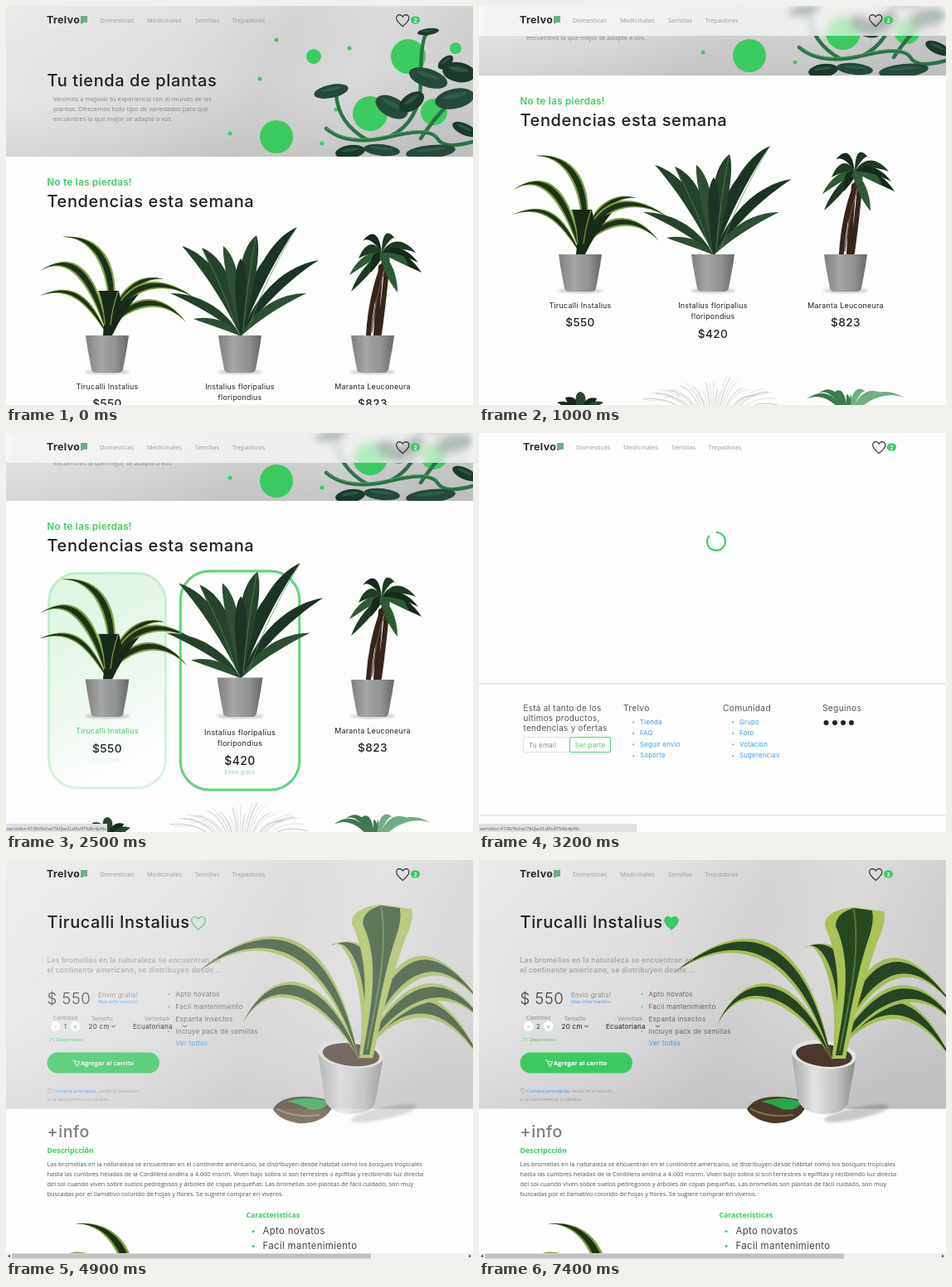
These frames come from a looping animation (563 by 482 pixels, 8 s). An HTML page:

```html
<!DOCTYPE html>
<html lang="es">
<head>
<meta charset="utf-8">
<title>Tienda de plantas</title>
<style>
html, body { margin: 0; width: 100%; height: 100%; overflow: hidden; background: #fff; }
svg { display: block; width: 100%; height: 100%; }
text { white-space: pre; }
.m { font-family: Inter, sans-serif; letter-spacing: .03em; }
.o { font-family: "Open Sans", sans-serif; }
</style>
</head>
<body>
<svg id="stage" viewBox="0 0 563 482" xmlns="http://www.w3.org/2000/svg"></svg>
<script>
const GREEN = '#3ccb60', INK = '#1d2022', BLUE = '#3a9bf4', GREY = '#9a9a9a';
const LOOP = 8000;

// ---- drawing helpers ----
const text = (x, y, s, size, fill = INK, o = {}) =>
  `<text class="${o.f || 'm'}" x="${x}" y="${y}" font-size="${size}" fill="${fill}" font-weight="${o.w || 400}" text-anchor="${o.a || 'start'}"${o.id ? ` id="${o.id}"` : ''}>${s}</text>`;
const sans = (x, y, s, size, fill, o = {}) => text(x, y, s, size, fill, { f: 'o', ...o });
const rect = (x, y, w, h, fill, more = '') => `<rect x="${x}" y="${y}" width="${w}" height="${h}" fill="${fill}" ${more}/>`;
const dot = (x, y, r, fill) => `<circle cx="${x}" cy="${y}" r="${r}" fill="${fill}"/>`;
const oval = (x, y, rx, ry, fill, rot = 0, more = '') =>
  `<ellipse cx="${x}" cy="${y}" rx="${rx}" ry="${ry}" fill="${fill}" transform="rotate(${rot} ${x} ${y})" ${more}/>`;
const path = (d, fill, more = '') => `<path d="${d}" fill="${fill}" ${more}/>`;
const line = (d, color, w, more = '') => path(d, 'none', `stroke="${color}" stroke-width="${w}" stroke-linecap="round" ${more}`);
const group = (id, body, more = '') => `<g id="${id}" ${more}>${body}</g>`;
const grad = (id, stops, dir) => `<linearGradient id="${id}" ${dir}>` +
  stops.map(([o, c, a = 1]) => `<stop offset="${o}" stop-color="${c}" stop-opacity="${a}"/>`).join('') + '</linearGradient>';

// Leaf around a cubic midline, w = bulge to each side
function leaf([a, b, c, d, e, f, g, h], w, fill) {
  const len = Math.hypot(g - a, h - b), nx = -(h - b) / len * w, ny = (g - a) / len * w;
  return path(`M${a} ${b}C${c + nx} ${d + ny} ${e + nx} ${f + ny} ${g} ${h}C${e - nx} ${f - ny} ${c - nx} ${d - ny} ${a} ${b}`, fill);
}
const striped = (bx, by, list, edge, core) => list.map(([x, y, c, d, e, f, w]) => {
  const p = [bx, by, c, d, e, f, x, y];
  return leaf(p, w, edge) + leaf(p, w * .6, core);
}).join('');
const blades = (bx, by, list, lift, colors) => list.map(([x, y, w], i) => {
  const dx = x - bx, dy = y - by;
  const p = [bx, by, bx + dx * .25, by + dy * .5 - lift, bx + dx * .65, by + dy * .85 - lift, x, y];
  return leaf(p, w, colors[i % colors.length]);
}).join('');
const heart = (x, y, w, stroke, sw, id) =>
  `<path id="${id}" transform="translate(${x} ${y}) scale(${w / 18})" fill="none" stroke="${stroke}" stroke-width="${sw}" d="M9 16C3 11 .7 8 .7 5C.7 2.400 2.700 .7 4.900 .7C6.700 .7 8.200 1.700 9 3.300C9.800 1.700 11.300 .7 13.100 .7C15.300 .7 17.300 2.400 17.300 5C17.300 8 15 11 9 16Z"/>`;
const bullets = (x, y, step, items, size, fill, r = 1) => items.map((s, i) =>
  dot(x - size * 1, y + i * step - size * .3, r, GREEN) + text(x, y + i * step, s, size, fill)).join('');

// ---- plants ----
const pot = x => oval(x, 442, 27, 3, '#777', 0, 'opacity=".35" filter="url(#soft)"') +
  path(`M${x - 26} 398H${x + 26}L${x + 24} 412L${x + 19} 439Q${x + 18} 443 ${x + 13} 443H${x - 13}Q${x - 18} 443 ${x - 19} 439L${x - 24} 412Z`, 'url(#pot)');

const bromelia = striped(122, 397, [
  [41, 350, 105, 365, 85, 332, 5], [217, 382, 135, 365, 180, 338, 7],
  [190, 330, 130, 360, 155, 322, 6], [228, 353, 135, 345, 175, 318, 7],
  [40, 321, 112, 350, 88, 288, 8], [68, 279, 137, 340, 122, 276, 8]
], '#7f9f45', '#1c3319') +
  path('M111 344H136L140 362Q146 352 160 348Q140 372 128 398H117Q121 370 111 344', '#172a17') +
  line('M112 345Q118 365 119 385M135 345Q128 365 126 385', '#7f9f45', 1.2);

const sword = blades(283, 399, [
  [198, 347, 7], [377, 307, 8], [362, 347, 7], [212, 290, 9], [351, 267, 9],
  [226, 378, 6], [236, 292, 10], [330, 292, 9], [262, 290, 9], [302, 277, 13], [283, 305, 9]
], 2, ['#25422b', '#1b3423', '#2e4f34']) +
  line('M286 392Q290 340 301 280M278 390Q262 340 237 294M292 390Q312 330 349 270', '#5d8a61', .7);

const pachira = line('M437 397Q440 350 455 312M446 397Q448 355 452 315M450 396Q455 360 459 318', '#35251b', 6) +
  line('M441 394Q446 350 456 320', '#65503e', 1.4) +
  blades(453, 298, [
    [416, 345, 6], [414, 325, 6], [501, 322, 7], [494, 298, 6], [472, 346, 7], [430, 284, 6],
    [470, 282, 6], [486, 315, 8], [440, 322, 7], [425, 305, 7], [460, 320, 8], [497, 310, 5]
  ], 12, ['#1e3a22', '#2f5a35', '#16291a']);

const noise = i => { const v = Math.sin(i * 91.7 + 4) * 4375.5; return v - Math.floor(v); };
let grass = '';
for (let i = 0; i < 34; i++) {
  const x = 198 + i * 5, y = 541 + Math.abs(x - 282) * .22 + noise(i) * 22;
  grass += line(`M282 640Q${282 + (x - 282) * .35} 565 ${x} ${y}`, i % 3 ? '#d6d4cf' : '#b3afa8', .7);
}
const secondRow = blades(123, 600, [[104, 571, 7], [122, 564, 8], [142, 572, 7], [150, 577, 6], [94, 577, 5]], 4, ['#16281a', '#29462d']) +
  grass + blades(445, 600, [
    [395, 573, 4], [512, 571, 4], [408, 567, 4], [490, 569, 4], [425, 568, 5], [468, 566, 5], [447, 572, 4]
  ], 16, ['#3d7a50', '#6fae80']);

const bigBromelia =
  oval(455, 306, 40, 7, '#555', -12, 'opacity=".3" filter="url(#soft)"') +
  path('M323 301Q332 285 362 286Q392 288 395 296Q386 318 354 318Q330 314 323 301', '#4b3a2a') +
  path('M340 292Q365 284 389 292Q385 304 366 301Q352 294 340 292', '#27a64a') +
  line('M328 301Q350 312 378 308', '#8b6d4e', 2) +
  path('M377 236L385 291Q392 307 417 307Q442 306 445 292L455 236Z', 'url(#bigPot)') +
  oval(416, 235, 39, 17, '#e4e5e4', 6) + oval(416, 236, 34, 13.5, '#4a382c', 6) +
  striped(425, 241, [
    [572, 245, 465, 172, 518, 145, 17], [580, 207, 470, 160, 530, 128, 15],
    [576, 182, 460, 130, 512, 88, 18], [287, 199, 395, 165, 325, 122, 14],
    [234, 137, 392, 108, 322, 68, 15], [392, 106, 458, 165, 430, 85, 20]
  ], '#a3bd55', '#264423') +
  path('M426 240C432 180 440 130 417 80Q415 62 450 57L488 62Q492 72 481 97C467 135 452 190 442 240Z', '#a9c257') +
  path('M430 236C440 180 451 125 430 80Q430 64 452 58L474 61Q477 75 469 97C456 135 447 190 438 236Z', '#27471f') +
  line('M435 230C447 165 460 115 452 60', '#55783c', 2);

// ---- home ----
const circles = [
  [326, 41, 2.5], [371, 61, 9], [414, 51, 2.5], [306, 88, 2.5], [485, 61, 21], [542, 51, 7], [439, 130, 21],
  [516, 128, 16], [326, 158, 20], [270, 154, 2.5], [381, 166, 2.5], [398, 125, 2.5]
].map(c => dot(...c, GREEN)).join('');
const vineLeaves = [
  [392, 103, 21, 8, -12], [509, 31, 13, 4, -8], [509, 87, 24, 11, 18], [546, 80, 20, 12, 10], [465, 122, 21, 12, 28],
  [489, 116, 17, 10, -35], [541, 112, 24, 12, -12], [415, 176, 18, 8, -8], [453, 174, 22, 7, 6], [553, 149, 16, 7, 25],
  [512, 176, 30, 8, -6], [530, 68, 11, 6, -40]
].map(([x, y, a, b, r], i) => oval(x, y, a, b, i % 2 ? '#1b3a2a' : '#25493a', r) +
  oval(x, y - b * .3, a * .6, b * .25, '#43705a', r, 'opacity=".5"')).join('');
const backdrop = h => rect(0, 0, 563, h, 'url(#wall)') + rect(0, 0, 563, h, 'url(#floor)');
const hero = group('hero', backdrop(182) + circles +
  line('M386 148Q412 170 462 158T520 160T563 164M398 106Q400 142 436 162M462 158Q500 140 500 90T507 34M500 160Q520 130 541 112', '#2c7247', 4.5) +
  line('M386 147Q412 168 462 156T520 158', '#5aa375', 1) + vineLeaves, 'clip-path="url(#heroClip)"') +
  text(49.5, 97, 'Tu tienda de plantas', 20, INK, { w: 500 }) +
  ['Venimos a mejorar tu experiencia con el mundo de las', 'plantas. Ofrecemos todo tipo de variedades para que',
    'encuentres la que mejor se adapte a vos.'].map((s, i) => sans(57, 115 + i * 12, s, 7.55, '#858585')).join('');

const products = [
  [122, ['Tirucalli Instalius'], '$550', bromelia],
  [282, ['Instalius floripalius', 'floripondius'], '$420', sword],
  [442, ['Maranta Leuconeura'], '$823', pachira]
];
const cards = products.map(([x, name, price, plant], i) => {
  const py = 485 + (name.length - 1) * 13.5;
  return group('card' + i,
    rect(x - 71, 269, 142, 260, 'url(#tint)', `rx="35" id="tint${i}"`) +
    rect(x - 70, 270, 140, 258, 'none', `rx="34" stroke="${GREEN}" stroke-width="3" id="edge${i}"`) +
    group('name' + i, name.map((s, k) => text(x, 463 + k * 13, s, 8.9, 'inherit', { a: 'middle' })).join('')) +
    text(x, py, price, 13.6, INK, { w: 500, a: 'middle' }) +
    text(x, py + 11, 'Envio gratis', 6.2, GREEN, { a: 'middle', id: 'free' + i })) +
    group('plant' + i, plant + pot(x));
}).join('');
const home = group('home', rect(0, 0, 563, 700, '#fdfdfd') + hero +
  text(49.5, 217, 'No te las pierdas!', 11.5, GREEN, { w: 600 }) +
  text(49.5, 243, 'Tendencias esta semana', 20, INK, { w: 500 }) + secondRow + cards);

// ---- loading ----
const loading = group('loading', rect(0, 0, 563, 482, '#fdfdfd') +
  `<circle id="spin" cx="286" cy="131" r="11" fill="none" stroke="${GREEN}" stroke-width="2" pathLength="360" stroke-dasharray="310 50"/>` +
  rect(0, 302, 563, 1, '#dcdcdc') + rect(0, 303, 563, 1, '#f3f3f3') + rect(0, 461, 563, 1.5, '#e6e6e6') +
  ['Está al tanto de los', 'ultimos productos,', 'tendencias y ofertas'].map((s, i) => text(53.5, 336 + i * 12, s, 9.9, '#555')).join('') +
  text(174, 336, 'Trelvo', 10.2, '#555') + text(294, 336, 'Comunidad', 10.2, '#555') + text(414, 336, 'Seguinos', 10.2, '#555') +
  rect(53.5, 367.500, 56, 18, '#fff', 'rx="1.5" stroke="#d5d8db" stroke-width=".8"') + text(60, 379.500, 'Tu email', 7.9, '#888') +
  rect(109.500, 367.500, 49, 18, '#fff', `rx="1.5" stroke="${GREEN}" stroke-width=".9"`) + text(134, 379.500, 'Ser parte', 7.9, GREEN, { a: 'middle' }) +
  bullets(194, 351.500, 13.6, ['Tienda', 'FAQ', 'Seguir envio', 'Soporte'], 7.8, BLUE) +
  bullets(314, 351.500, 13.6, ['Grupo', 'Foro', 'Votación', 'Sugerencias'], 7.8, BLUE) +
  [418.5, 429, 439, 449].map(x => dot(x, 350, 3, '#222')).join(''));

// ---- product page ----
const chevron = (x, y) => line(`M${x} ${y}l2 2l2 -2`, '#333', 1);
const step = (x, s, id) => `<circle id="${id}" cx="${x}" cy="201" r="6" fill="#fff"/>` + text(x, 203.5, s, 7.500, '#49a873', { a: 'middle' });
const features = ['Apto novatos', 'Facil mantenimiento', 'Espanta insectos', 'Incluye pack de semillas'];
const detail = group('detail', rect(0, 0, 563, 482, '#fdfdfd') + group('wallpaper', backdrop(300.5)) +
  text(49.5, 335, '+info', 19.6, '#7a7d7b', { w: 500 }) + sans(49.5, 354, 'Descripcción', 8.9, GREEN, { w: 700 }) +
  ['Las bromelias en la naturaleza se encuentran en el continente americano, se distribuyen desde hábitat como los bosques tropicales',
    'hasta las cumbres heladas de la Cordillera andina a 4.000 msnm. Viven bajo sobra si son terrestres o epifitas y recibiendo luz directa',
    'del sol cuando viven sobre suelos pedregosos y árboles de copas pequeñas. Las bromelias son plantas de fácil cuidado, son muy',
    'buscadas por el llamativo colorido de hojas y flores. Se sugiere comprar en viveros.'
  ].map((s, i) => sans(49.5, 369.5 + i * 12, s, 7.4, '#555')).join('') +
  group('lower', bromelia) +
  sans(289.5, 432, 'Caracteristicas', 8.7, GREEN, { w: 700 }) + bullets(309.500, 452, 18, features.slice(0, 3), 11.4, '#444', 1.5) +
  group('title', text(49.5, 81.5, 'Tirucalli Instalius', 20, INK, { w: 500 })) +
  group('bigPlant', bigBromelia) +
  group('info', heart(223, 68, 18, GREEN, 1.3, 'like') +
    text(49.5, 124, 'Las bromelias en la naturaleza se encuentran en', 8.5, '#a5a5a5', { w: 600 }) +
    text(49.5, 136, 'el continente americano, se distribuyen desde...', 8.5, '#a5a5a5', { w: 600 }) +
    text(49.5, 173.500, '$ 550', 18.6, '#3a3a3a', { w: 300 }) + text(111, 166, 'Envio gratis!', 7.800, '#8c8c8c') +
    sans(111, 173, 'Mas información', 6, BLUE) +
    sans(57, 193, 'Cantidad', 6.7, '#999', { w: 600 }) + sans(103, 193.5, 'Tamaño', 6.7, '#999', { w: 600 }) + sans(167, 193.5, 'Variedad', 6.7, '#999', { w: 600 }) +
    step(59.5, '-', 'less') + step(83.5, '+', 'more') + text(71.5, 204, '1', 8, '#333', { a: 'middle', id: 'qty' }) +
    text(99.5, 204, '20 cm', 8.100, INK) + chevron(127.5, 200) + text(153, 204, 'Ecuatoriana', 8.1, INK) + chevron(213.5, 200) +
    sans(52, 218.500, '71 Disponibles', 6, GREEN) +
    bullets(204.5, 164.500, 15.1, features, 8.1, '#666') + text(204.5, 224, 'Ver todas', 8.1, BLUE) +
    rect(49.5, 232.500, 135.5, 25, GREEN, 'rx="12.5" id="buy"') +
    line('M80.5 242H82.500L84 247H87.500L88.500 243.500H83', '#fff', .9) + dot(84.500, 249, .8, '#fff') + dot(87.300, 249, .8, '#fff') +
    sans(90, 248, 'Agregar al carrito', 7.4, '#fff', { w: 700 }) +
    line('M50.500 277l2 -1l2 1q0 4 -2 5q-2 -1 -2 -5', '#999', .6) +
    sans(57, 281, `<tspan fill="${BLUE}">Compra protegida</tspan>, recibí el producto`, 6.1, GREY) +
    sans(49.5, 290.500, 'o te devolvemos tu dinero', 6.1, GREY)) +
  group('bar', rect(0, 475, 563, 7, '#f1f1f1') + rect(7, 475.500, 433, 6, '#c1c1c1') +
    path('M2 478.500l3 -2v4zM561 478.500l-3 -2v4z', '#555')));

// ---- header and status bar ----
const header = group('frost', rect(0, 0, 563, 36, '#fff') +
  '<g filter="url(#blur)"><use id="under" href="#hero"/></g>' + rect(0, 0, 563, 36, '#fff', 'opacity=".62"'), 'clip-path="url(#headClip)"') +
  group('head', text(49, 21, 'Trelvo.', 12.4, '#26292b', { w: 700 }) + rect(90, 12, 8, 8, '#6fae85') +
    [[113, 'Domesticas'], [170, 'Medicinales'], [228, 'Semillas'], [272.5, 'Trepadoras']].map(([x, s]) => sans(x, 20, s, 7.6, GREY)).join('') +
    heart(470, 10, 16.5, '#222', 1.2, 'favs') + rect(488, 12.5, 11, 9, GREEN, 'rx="4.500"') +
    sans(493.5, 19.500, '2', 6.4, '#fff', { w: 700, a: 'middle', id: 'count' }));
const status = group('status', rect(0, 472, 122, 10, '#dee1e4', 'id="statusBox"') + sans(1, 479.800, '', 6, '#5a5d60', { id: 'url' }));

const defs = '<defs>' +
  grad('wall', [[0, '#e7e7e7'], [.4, '#dedede'], [.62, '#d2d2d2'], [.8, '#dadada'], [1, '#cfcfcf']], 'x2="1" y2=".15"') +
  grad('floor', [[0, '#fff', .1], [.5, '#bbb', 0], [1, '#999', .3]], 'x1=".35" y1="0" x2=".6" y2="1"') +
  grad('pot', [[0, '#7d807e'], [.35, '#a4a7a5'], [.7, '#8f9290'], [1, '#666967']], '') +
  grad('bigPot', [[0, '#a9abaa'], [.35, '#e2e3e2'], [.7, '#c2c4c3'], [1, '#858786']], '') +
  grad('tint', [[0, GREEN, .17], [.4, GREEN, .13], [1, GREEN, 0]], 'x2=".3" y2="1"') +
  '<filter id="soft"><feGaussianBlur stdDeviation="1.5"/></filter><filter id="blur"><feGaussianBlur stdDeviation="5"/></filter>' +
  '<clipPath id="headClip"><rect width="563" height="36"/></clipPath><clipPath id="heroClip"><rect width="563" height="182"/></clipPath></defs>';

const stage = document.getElementById('stage');
stage.innerHTML = defs + home + loading + detail + header + status;

// ---- motion ----
const $ = {};
stage.querySelectorAll('[id]').forEach(el => $[el.id] = el);
const set = (id, key, value) => $[id].setAttribute(key, value);
const show = (id, on) => set(id, 'visibility', on ? 'visible' : 'hidden');
const clamp = v => Math.max(0, Math.min(1, v));
const smooth = v => { v = clamp(v); return v * v * (3 - 2 * v); };
const scaleAt = (x, y, s) => `translate(${x} ${y}) scale(${s}) translate(${-x} ${-y})`;
const hovers = [[2500, 9000], [2000, 2500], [1300, 2000]];
const links = ['7kQw2LdXv9TbRz4pNs', '3mHt8VbCy5GxWq1rKe', '9pZc4NfSj6MuDa2wLo'];

function draw(time) {
  const t = Math.floor(time / 100) * 100;
  const onHome = t < 3200, onLoad = t >= 3200 && t < 4100, onItem = t >= 4100;
  show('home', onHome); show('loading', onLoad); show('detail', onItem);

  const scroll = t < 800 ? 0 : t < 900 ? 8 : t < 1000 ? 51 : t < 1100 ? 98 : 100;
  set('home', 'transform', `translate(0 ${-scroll})`);
  set('under', 'transform', `translate(0 ${-scroll})`);
  show('frost', onHome && scroll > 0);
  set('head', 'transform', `translate(${onLoad ? 4 : 0} 0)`);

  hovers.forEach(([from, to], i) => {
    const ease = start => t < start ? 0 : smooth((t - start + 80) / 280);
    const p = ease(from) - ease(to), on = t >= from && t < to, x = products[i][0];
    set('card' + i, 'transform', scaleAt(x, 399, 1 + .03 * p));
    set('plant' + i, 'transform', scaleAt(x, 443, 1 + .07 * p));
    set('tint' + i, 'opacity', on ? 1 : 0);
    set('edge' + i, 'opacity', p);
    set('free' + i, 'opacity', p * .8);
    set('name' + i, 'fill', on ? GREEN : INK);
  });

  const current = t < 2000 ? 2 : t < 2500 ? 1 : 0;
  show('status', t >= 1700 && t < 3600);
  set('status', 'opacity', t < 1800 ? .5 : 1);
  set('statusBox', 'width', onLoad ? 190 : 122);
  $.url.textContent = 'servidor:4100/ficha/' + links[current];
  set('spin', 'transform', `rotate(${-90 + (t - 3200) / 750 * 360} 286 131)`);

  const fade = clamp((t - 4050) / 1100);
  set('wallpaper', 'opacity', fade);
  set('info', 'opacity', fade);
  set('title', 'opacity', clamp(fade * 1.6));
  const grow = smooth((t - 4400) / 800);
  set('bigPlant', 'opacity', grow);
  set('bigPlant', 'transform', scaleAt(415, 305, 1.04 - .04 * grow));
  set('lower', 'transform', `translate(20 160) ${scaleAt(100, 277, 1.6 - .45 * smooth((t - 4300) / 600))}`);
  show('bar', onItem && t >= 4600);

  set('buy', 'fill', t === 5500 ? '#37bd58' : t === 5600 ? '#34b353' : GREEN);
  set('more', 'fill', t >= 5900 && t < 6700 ? '#dff3e5' : '#fff');
  $.qty.textContent = t >= 6200 ? 2 : 1;
  const liked = t >= 7400;
  set('like', 'fill', liked ? GREEN : 'none');
  $.count.textContent = liked ? 3 : 2;
}

const start = performance.now();
function tick() {
  draw((performance.now() - start) % LOOP);
  requestAnimationFrame(tick);
}
tick();
</script>
</body>
</html>
```
